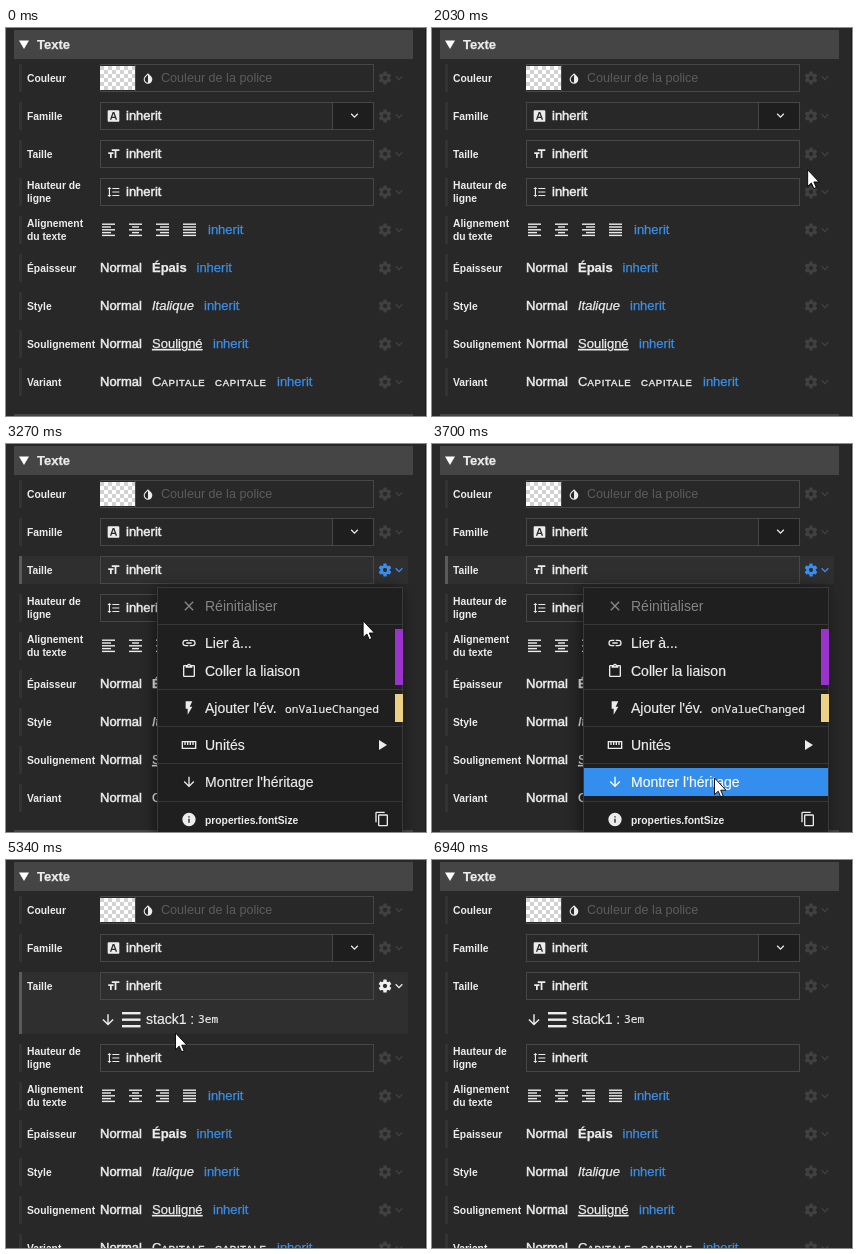
Recreate the animation shown at these times as an HTML page. Size 420 by 388 pixels, loop 7.72 s.

```html
<!DOCTYPE html>
<html lang="fr">
<head>
<meta charset="utf-8">
<title>Texte</title>
<style>
html, body { margin: 0; width: 100%; height: 100%; overflow: hidden; background: #282828; }
svg { display: block; }
text { font-family: "Liberation Sans", Arial, sans-serif; fill: #ececec; stroke: #ececec; stroke-width: 0; white-space: pre; }
.label { font-size: 10.3px; font-weight: bold; }
.value { font-size: 13px; stroke-width: .25px; }
.firm { stroke-width: .5px; }
.bold { font-weight: bold; }
.italic { font-style: italic; }
.under { text-decoration: underline; }
.hint { font-size: 12.6px; fill: #5c5c5c; }
.link { fill: #3a8ee6; stroke: #3a8ee6; }
.caps { font-size: 9.5px; letter-spacing: .8px; stroke-width: .4px; }
.item { font-size: 14px; stroke-width: .2px; }
.code { font: 11.2px "Noto Sans Mono", "DejaVu Sans Mono", monospace; stroke-width: .2px; }
.box { fill: none; stroke: #474747; }
.icon { fill: #ececec; fill-rule: evenodd; }
.back { fill: none; }
.bar { fill: #333; }
.tools { color: #414141; }
.row.on .back { fill: #2f2f2f; }
.row.on .bar { fill: #5a5a5a; }
.row.on .tools { color: #f0f0f0; }
.row.opening .tools { color: #6d86d2; }
.row.open .tools { color: #3a8ef0; }
.entry .fill { fill: none; }
.entry.on .fill { fill: #338eee; }
.entry.on text, .entry.on .icon { fill: #fff; }
.off text, .off .icon { fill: #858585; stroke: none; }
</style>
</head>
<body>
<script>
const LOOP = 7720, STEP = 70, SHIFT = 34;

const ICONS = {
  chevron: "M7.41 8.58L12 13.17L16.59 8.58L18 10L12 16L6 10Z",
  drop: "M12 19.58C10.4 19.58 8.89 18.96 7.76 17.83C6.62 16.69 6 15.19 6 13.58C6 12 6.62 10.47 7.76 9.34L12 5.1M17.66 7.93L12 2.27L6.34 7.93C3.22 11.05 3.22 16.12 6.34 19.24C7.9 20.8 9.95 21.58 12 21.58C14.05 21.58 16.1 20.8 17.66 19.24C20.78 16.12 20.78 11.05 17.66 7.93Z",
  font: "M4 2H20Q22 2 22 4V20Q22 22 20 22H4Q2 22 2 20V4Q2 2 4 2ZM10.6 5L5.8 18.5H8.3L9.3 15.5H14.7L15.7 18.5H18.2L13.4 5ZM12 7.7L14 13.3H10Z",
  size: "M9 4V7H14V19H17V7H22V4H9M3 12H6V19H9V12H12V9H3Z",
  leading: "M10 13H22V11H10M10 19H22V17H10M10 7H22V5H10M6 7H8.5L5 3.5L1.5 7H4V17H1.5L5 20.5L8.5 17H6Z",
  close: "M19 6.4L17.6 5L12 10.6L6.4 5L5 6.4L10.6 12L5 17.6L6.4 19L12 13.4L17.6 19L19 17.6L13.4 12Z",
  chain: "M3.9 12A3.1 3.1 0 0 1 7 8.9H11V7H7A5 5 0 0 0 7 17H11V15.1H7A3.1 3.1 0 0 1 3.9 12M8 13H16V11H8ZM17 7H13V8.9H17A3.1 3.1 0 0 1 17 15.1H13V17H17A5 5 0 0 0 17 7Z",
  paste: "M19 3H14.8A3 3 0 0 0 9.2 3H5A2 2 0 0 0 3 5V19A2 2 0 0 0 5 21H19A2 2 0 0 0 21 19V5A2 2 0 0 0 19 3M12 3A1 1 0 0 1 12 5A1 1 0 0 1 12 3M7 7H17V5H19V19H5V5H7Z",
  flash: "M7 2V13H10V22L17 10H13L17 2Z",
  ruler: "M1 6H23V18H1ZM3 8V16H21V8H19V12H17V8H15V12H13V8H11V12H9V8H7V12H5V8Z",
  down: "M11 4H13V16L18.5 10.5L19.9 11.9L12 19.8L4.1 11.9L5.5 10.5L11 16Z",
  info: "M13 9H11V7H13ZM13 17H11V11H13ZM12 2A10 10 0 0 0 12 22A10 10 0 0 0 12 2Z",
  copy: "M19 21H8V7H19M19 5H8A2 2 0 0 0 6 7V21A2 2 0 0 0 8 23H19A2 2 0 0 0 21 21V7A2 2 0 0 0 19 5M16 1H4A2 2 0 0 0 2 3V17H4V3H16Z"
};

const rect = (x, y, w, h, attrs = "") =>
  `<rect x="${x}" y="${y}" width="${w}" height="${h}" ${attrs}/>`;
const text = (x, y, str, cls = "value") => `<text x="${x}" y="${y}" class="${cls}">${str}</text>`;
const icon = (name, cx, cy, size, attrs = 'class="icon"') =>
  `<path d="${ICONS[name]}" ${attrs} transform="translate(${cx - size / 2} ${cy - size / 2}) scale(${size / 24})"/>`;
const box = (x, y, w, h) => rect(x + .5, y + .5, w - 1, h - 1, 'class="box"');

const tooth = a => `<rect x="-1.7" y="-6.4" width="3.4" height="4" rx=".5" fill="currentColor" transform="rotate(${a})"/>`;
const tools = cy => `<g class="tools"><g transform="translate(379 ${cy})">
  <circle r="3.5" fill="none" stroke="currentColor" stroke-width="2.7"/>
  ${[0, 60, 120, 180, 240, 300].map(tooth).join("")}</g>
  ${icon("chevron", 393, cy, 15, 'fill="currentColor"')}</g>`;

const value = (x, cy, str, cls = "") => text(x, cy + 4, str, "value " + cls);
const normal = cy => value(94, cy, "Normal", "firm");
const inherit = (x, cy) => value(x, cy, "inherit", "link");
const field = (cy, name) =>
  box(94, cy - 14, 274, 28) + icon(name, 107.5, cy, 14) + value(120, cy, "inherit", "firm");

const alignIcon = (x, cy, width, anchor) => [0, 1, 2, 3, 4].map(i => {
  const w = i % 2 ? width : 13;
  return rect(x + (13 - w) * anchor, cy - 6.5 + i * 2.8, w, 1.4, 'class="icon"');
}).join("");

function checker(x, y, w, h, s) {
  let out = rect(x, y, w, h, 'fill="#fff"');
  for (let j = 0; j * s < h; j++)
    for (let i = j % 2; i * s < w; i += 2)
      out += rect(x + i * s, y + j * s, Math.min(s, w - i * s), Math.min(s, h - j * s), 'fill="#d2d2d2"');
  return out;
}

const rows = [
  ["Couleur", cy => box(94, cy - 14, 274, 28) + checker(94, cy - 12, 35, 24, 4)
    + rect(129, cy - 14, 1, 28, 'fill="#474747"') + icon("drop", 142, cy + .5, 13)
    + text(155, cy + 4, "Couleur de la police", "hint")],
  ["Famille", cy => field(cy, "font") + rect(326.5, cy - 13.5, 41, 27, 'fill="#1e1e1e" stroke="#474747"')
    + icon("chevron", 348.5, cy - .5, 15)],
  ["Taille", cy => field(cy, "size")],
  ["Hauteur de|ligne", cy => field(cy, "leading")],
  ["Alignement|du texte", cy => alignIcon(96, cy, 9, 0) + alignIcon(123, cy, 7, .5)
    + alignIcon(150, cy, 9, 1) + alignIcon(177, cy, 13, 0) + inherit(202, cy)],
  ["Épaisseur", cy => normal(cy) + value(146, cy, "Épais", "bold") + inherit(190.5, cy)],
  ["Style", cy => normal(cy) + value(146, cy, "Italique", "italic") + inherit(198, cy)],
  ["Soulignement", cy => normal(cy) + value(146, cy, "Souligné", "under") + inherit(207, cy)],
  ["Variant", cy => normal(cy) + value(146, cy, 'C<tspan class="caps">APITALE</tspan>')
    + text(209, cy + 4, "CAPITALE", "caps") + inherit(271, cy)]
];

function rowMarkup([label, draw], i) {
  const cy = 50 + 38 * i, lines = label.split("|");
  const first = lines.length > 1 ? cy - 3 : cy + 4;
  const names = lines.map((s, k) => text(21, first + k * 13, s, "label")).join("");
  return `<g class="row">${rect(13, cy - 14, 389, 28, 'class="back"')}${rect(13, cy - 14, 3, 28, 'class="bar"')}
    ${names}${draw(cy)}${tools(cy)}</g>`;
}

const heritage = `<g id="heritage">${icon("down", 102, 160, 17)}
  ${[152, 158.5, 165].map(y => rect(116, y, 18.5, 2.4, 'class="icon"')).join("")}
  ${text(140, 164, "stack1 :", "item")}${text(192, 163, "3em", "code")}</g>`;

const entries = [
  [162, "close", "Réinitialiser"], [199, "chain", "Lier à..."], [227, "paste", "Coller la liaison"],
  [264, "flash", "Ajouter l'év."], [301, "ruler", "Unités"], [338, "down", "Montrer l'héritage"]
];
const entryMarkup = ([cy, name, label]) =>
  `<g class="entry${name === "close" ? " off" : ""}">${rect(152, cy - 14, 244, 28, 'class="fill"')}
   ${icon(name, 183, cy, 16)}${text(199, cy + 5, label, "item")}</g>`;

const menu = `<g id="menu" style="filter:drop-shadow(-2px 1px 7px rgba(0,0,0,.5))">
  ${rect(151.5, 143.5, 245, 270, 'fill="#1f1f1f" stroke="#3a3a3a"')}
  ${entries.map(entryMarkup).join("")}
  ${[180, 245, 282, 319, 357].map(y => rect(152, y, 244, 1, 'fill="#373737"')).join("")}
  ${rect(389, 185, 8, 56, 'fill="#9a33cc"')}${rect(389, 250, 8, 28, 'fill="#ecd084"')}
  ${text(279, 268.5, "onValueChanged", "code")}
  <path class="icon" d="M373 296L381 301L373 306Z"/>
  ${icon("info", 183, 375.5, 16)}${text(199, 379.5, "properties.fontSize", "label")}${icon("copy", 376, 375, 16)}
</g>`;

document.body.innerHTML = `<svg width="420" height="388" viewBox="0 0 420 388">
  ${rect(0, 0, 420, 388, 'fill="#282828"')}${rect(419, 0, 1, 388, 'fill="#1d1d1d"')}
  ${rect(8, 2, 399, 29, 'fill="#454545"')}
  <path d="M13 12.5H23L18 21Z" fill="#fff"/>
  ${text(31, 21, "Texte", "value bold")}
  ${rows.slice(0, 3).map(rowMarkup).join("")}${heritage}
  <g id="lower">${rows.slice(3).map((r, i) => rowMarkup(r, i + 3)).join("")}
    ${rect(8, 386, 399, 2, 'fill="#454545"')}</g>
  ${menu}
  <path id="cursor" d="M-.5 -1V15.6L3.2 12.2L5.7 17.8L8.1 16.7L5.7 11.2H10.9Z" fill="#fff" stroke="#000" stroke-width=".9"/>
</svg>`;

const $ = id => document.getElementById(id);
const rowEls = [...document.querySelectorAll(".row")];
const entryEls = [...document.querySelectorAll(".entry")];
const toggleLabel = entryEls[5].querySelector("text");
const sizeParts = rowEls[2].querySelectorAll(".back, .bar");

// start, end, target x, target y
const moves = [
  [1400, 2100, 377, 137], [3000, 3700, 283, 335], [4660, 5340, 170, 174],
  [5340, 5550, 118, 155], [5900, 6040, 141, 158], [6520, 6590, 296, 291], [6660, 6940, 318, 400]
];
// time, menu opacity
const fade = [[0, 0], [2460, 1], [4450, .85], [4590, .65], [4660, .4], [4730, .15], [4800, 0]];

function cursorAt(t) {
  let x = 343, y = 372;
  for (const [start, end, tx, ty] of moves) {
    if (t < start) break;
    const held = t >= end ? end : start + Math.floor((t - start) / STEP) * STEP;
    const p = (held - start) / (end - start), e = (1 - Math.cos(Math.PI * p)) / 2;
    x += (tx - x) * e;
    y += (ty - y) * e;
  }
  return [x, y];
}

function hoveredRow(t, y, open) {
  if (t < 1400 || t >= 6940) return -1;
  if (t >= 2100 && t < 4800 || t >= 5340 && t < 6730) return 2;
  return rows.findIndex((_, i) => {
    const top = 36 + 38 * i + (open && i > 2 ? SHIFT : 0);
    return y >= top && y <= top + (open && i === 2 ? 62 : 28);
  });
}

function draw(t) {
  const [x, y] = cursorAt(t), open = t >= 4240;
  const alpha = fade.filter(f => t >= f[0]).pop()[1];
  const hover = hoveredRow(t, y, open);

  $("cursor").setAttribute("transform", `translate(${x} ${y})`);
  $("cursor").style.display = t >= 1400 && t < 6940 ? "" : "none";
  $("heritage").style.display = open ? "" : "none";
  $("lower").setAttribute("transform", `translate(0 ${open ? SHIFT : 0})`);
  sizeParts.forEach(el => el.setAttribute("height", open ? 62 : 28));

  rowEls.forEach((el, i) => el.classList.toggle("on", i === hover));
  rowEls[2].classList.toggle("opening", alpha > 0 && t < 3070);
  rowEls[2].classList.toggle("open", alpha > 0 && t >= 3070);

  $("menu").style.display = alpha ? "" : "none";
  $("menu").style.opacity = alpha;
  toggleLabel.textContent = open ? "Cacher l'héritage" : "Montrer l'héritage";
  entryEls.forEach((el, i) => el.classList.toggle("on", i > 0 && Math.abs(y - entries[i][0]) < 14));
}

const begin = performance.now();
function tick() {
  draw((performance.now() - begin) % LOOP);
  requestAnimationFrame(tick);
}
tick();
</script>
</body>
</html>
```
